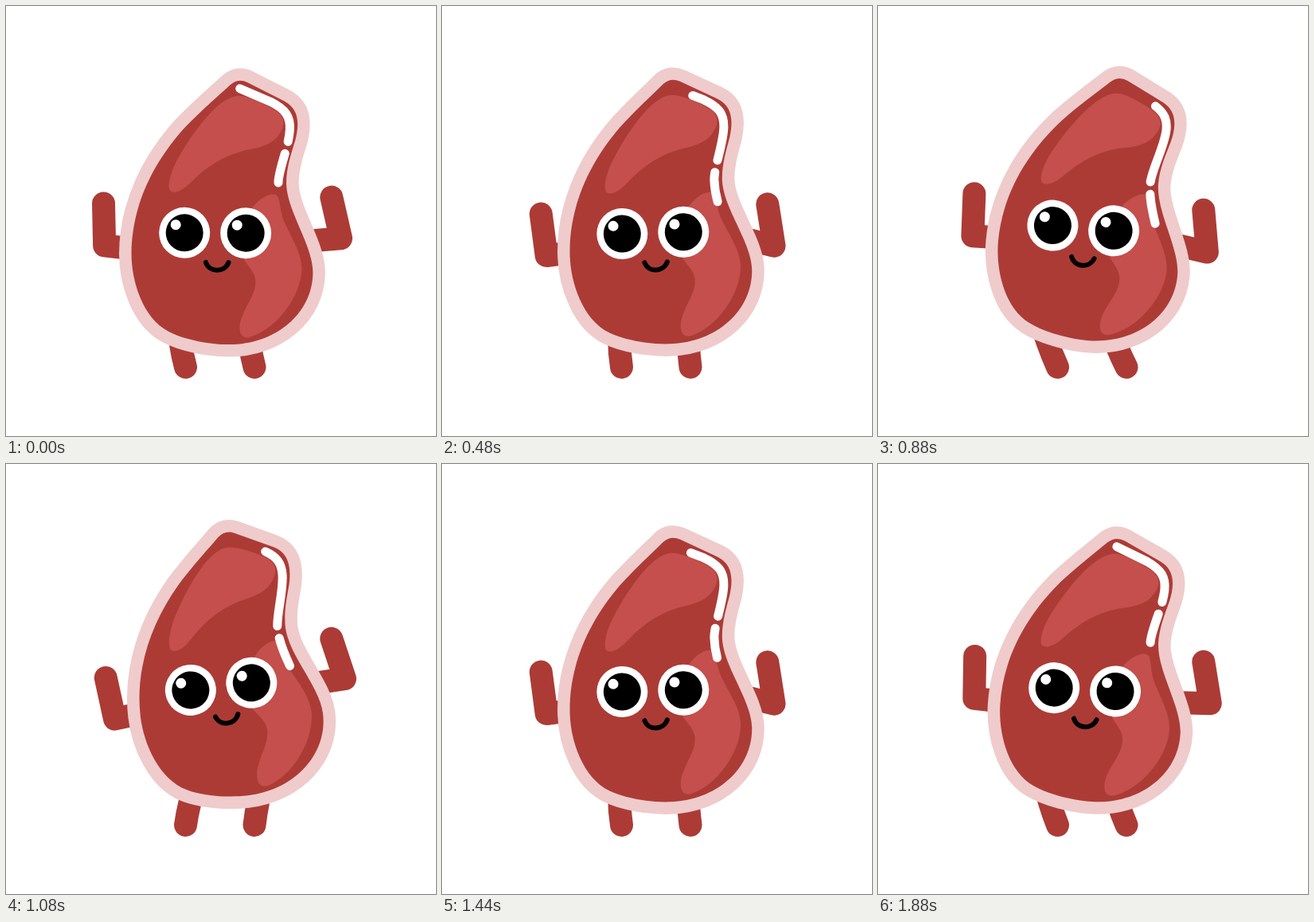
An HTML page for the animation above (1920 ms loop, 540 by 540 pixels).

```html
<!DOCTYPE html>
<html lang="en">
<head>
<meta charset="utf-8">
<title>Dancing steak</title>
<style>
  html, body { margin: 0; width: 100%; height: 100%; overflow: hidden; background: #fff; }
  svg { display: block; width: 100%; height: 100%; }
  .limb { fill: none; stroke: #ac3b36; stroke-width: 29; stroke-linecap: round; stroke-linejoin: round; }
  .patch { fill: #c44f4c; }
  .line { fill: none; stroke-linecap: round; }
</style>
</head>
<body>
<svg viewBox="0 0 540 540">
  <path id="legL" class="limb"/>
  <path id="legR" class="limb"/>
  <path id="armL" class="limb"/>
  <path id="armR" class="limb"/>
  <g id="body">
    <path fill="#ac3b36" stroke="#efcbcc" stroke-width="31" stroke-linejoin="round" paint-order="stroke"
      d="M281 99Q291 90 303 96L349 119C368 129 368 148 363 168C358 185 352 202 352 222C353 258 386 300 386 334C386 385 340 425 280 425C256 425 224 419 205 409C172 392 158 345 158 311C158 250 186 195 225 152C246 130 266 113 281 99Z"/>
    <path class="patch" d="M288 113C300 110 330 125 341 133C350 140 350 150 343 160C336 172 322 177 305 180C275 186 250 203 232 222C222 232 213 236 207 233C202 229 205 214 213 197C228 168 262 117 288 113Z"/>
    <path class="patch" d="M336 236C344 236 343 247 346 259C350 279 372 304 372 330C371 366 339 407 306 416C293 418 292 402 298 388C305 371 315 360 314 344C312 328 296 322 292 300C292 270 316 236 336 236Z"/>
    <path id="shine" class="line" stroke="#fff" stroke-width="11" stroke-dasharray="103 15.5 37.5 999"
      d="M293 103.5L332 120C350 129 357 138 356 155C355 175 343 203 342 220C342 240 347 255 353 273"/>
    <g id="eye">
      <circle cx="224.5" cy="285" r="32" fill="#fff"/>
      <circle cx="224.5" cy="285" r="23.5"/>
      <circle cx="213.5" cy="275" r="6.5" fill="#fff"/>
    </g>
    <use href="#eye" x="77"/>
    <path class="line" stroke="#000" stroke-width="6" d="M251.5 322C256 335 275 335 280 322"/>
  </g>
</svg>
<script>
const LOOP = 1920, BEAT = 960, STEP = 40;
const PIVOT = { x: 262.5, y: 225 };
const $ = id => document.getElementById(id);
const rad = degrees => degrees * Math.PI / 180;
const ease = u => u ** 3 / (u ** 3 + (1 - u) ** 3);

// Sine over one beat, shifted by a phase in degrees
const wave = (t, phase) => Math.sin(2 * Math.PI * t / BEAT + rad(phase));

// Body angle in degrees: eased swings between left and right
function tilt(t) {
  const p = (t + BEAT - 252) % BEAT / (BEAT / 2);
  const e = p < 1 ? ease(p) : 1 - ease(p - 1);
  return -0.7 + 6.8 * (2 * e - 1);
}

function hop(t, start, length) {
  const u = (t - start) / length;
  return u > 0 && u < 1 ? -15.5 * Math.sin(Math.PI * u) ** 2 : 0;
}

function draw(time) {
  const t = time % BEAT;
  const angle = tilt(t);
  const rise = hop(t, 30, 460) + hop(t, 580, 380);
  const cos = Math.cos(rad(angle)), sin = Math.sin(rad(angle));

  const onBody = (x, y) => {
    const dx = x - PIVOT.x, dy = y - PIVOT.y;
    return [PIVOT.x + dx * cos - dy * sin, PIVOT.y + dx * sin + dy * cos + rise];
  };
  const leg = (id, footX, hipX) => {
    const footY = 453.5, [x, y] = onBody(hipX, 400);
    $(id).setAttribute("d", `M${footX} ${footY}Q${(footX + x) / 2 - 3} ${(footY + y) / 2} ${x} ${y}`);
  };
  const arm = (id, handX, handY, bend, shoulder) => {
    const elbowX = handX + 53 * Math.sin(rad(bend));
    const elbowY = handY + 53 * Math.cos(rad(bend));
    $(id).setAttribute("d", `M${handX} ${handY}L${elbowX} ${elbowY}L${shoulder.join(" ")}`);
  };

  $("body").setAttribute("transform", `translate(0 ${rise}) rotate(${angle} ${PIVOT.x} ${PIVOT.y})`);
  leg("legL", 225.5, 218);
  leg("legR", 312, 305);

  const left = wave(t, -14), right = -wave(t, 8);
  arm("armL", 123.4 + 3.6 * left, 254.5 + 27 * left, 4 + 13 * left + 6 * left ** 2, onBody(165, 306));
  arm("armR", 408.8, 244.5 + 31.5 * right, 11 - 14 * right - 6 * right ** 2, onBody(375, 295));

  const slide = 26 * (1 - Math.cos(2 * Math.PI * (time + 15) / LOOP));
  $("shine").setAttribute("stroke-dashoffset", -slide);
}

const start = performance.now();
function frame() {
  const time = (performance.now() - start) % LOOP;
  draw(Math.floor(time / STEP) * STEP);
  requestAnimationFrame(frame);
}
frame();
</script>
</body>
</html>
```
